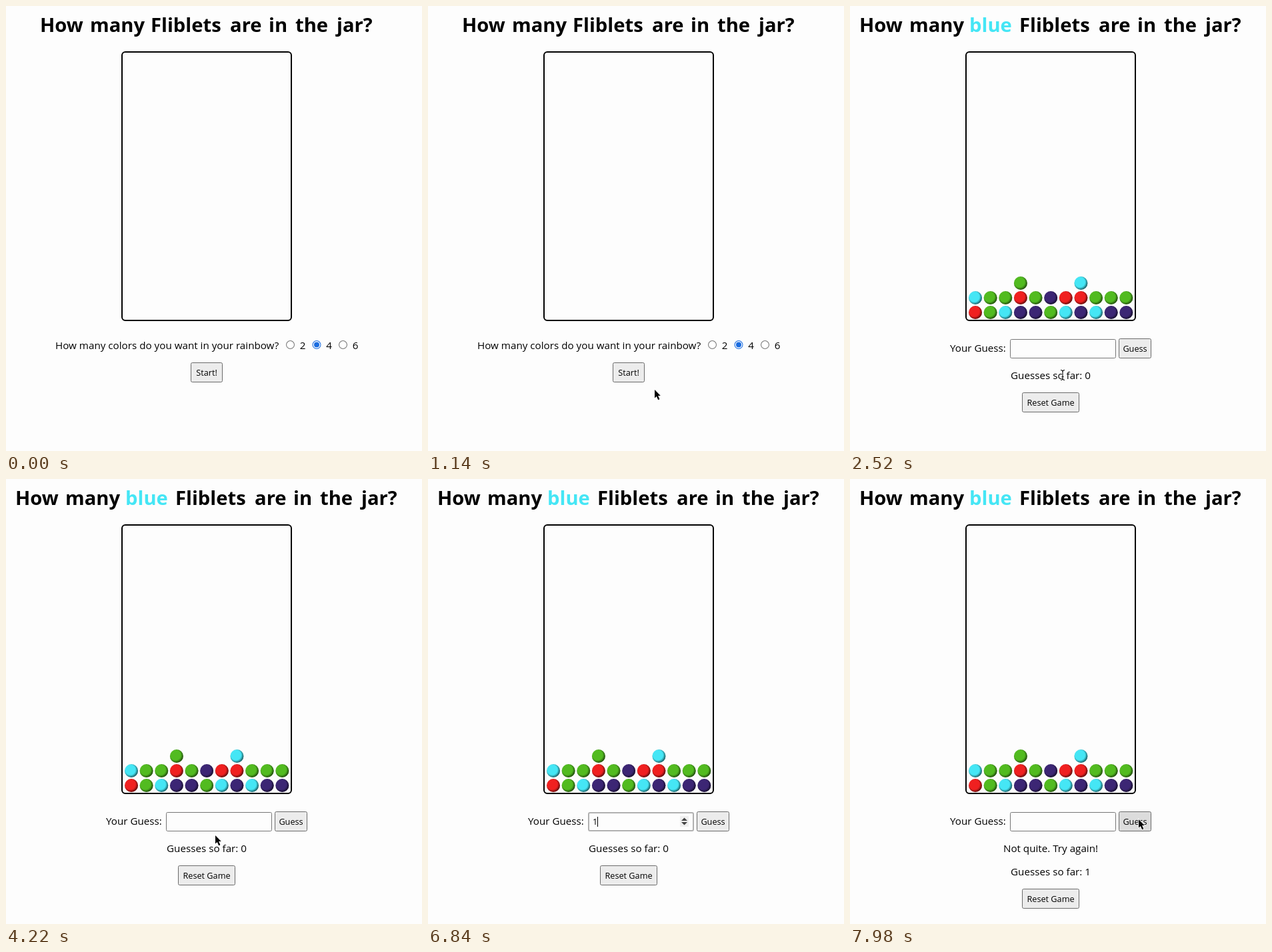
An HTML page with a canvas for the animation above (8 s loop, 624 by 668 pixels).

```html
<!DOCTYPE html>
<html lang="en">
<head>
<meta charset="utf-8">
<title>How many are in the jar?</title>
<style>
  html, body { margin: 0; width: 100%; height: 100%; overflow: hidden; background: #fdfdfd; }
  canvas { display: block; }
</style>
</head>
<body>
<canvas id="stage" width="624" height="668"></canvas>
<script>
const ctx = document.getElementById('stage').getContext('2d');
const LOOP = 8000, START = 2500, FOCUS = 4600, TYPED = 6400, BLUR = 7600, RESULT = 7680;
const PAPER = '#fdfdfd', BUTTON = '#ececec', BUTTON_HOVER = '#dcdcdc', BLUE = '#45e6f5';
const FONT = '"Open Sans", "Noto Sans", sans-serif';
const CANDY = { r: '#f02020', g: '#52bb20', b: BLUE, p: '#3c2674' };
const ROWS = ['rgbppgbpbpp', 'bggrgprrggg', '   g   b   ']; // bottom row first

// Pointer stops: time, x, y
const PATH = [
  [100, 395, 672], [820, 345, 594], [1140, 340, 576], [1240, 340, 576], [1700, 319, 554],
  [3400, 319, 554], [4180, 314, 535], [4320, 314, 535], [4560, 317, 511],
  [6900, 317, 511], [7400, 433, 511]
];

function pointerAt(t) {
  const next = PATH.findIndex(stop => stop[0] > t);
  if (next < 0) return PATH[PATH.length - 1].slice(1);
  if (next === 0) return PATH[0].slice(1);
  const [t0, x0, y0] = PATH[next - 1], [t1, x1, y1] = PATH[next];
  const u = (t - t0) / (t1 - t0), k = u * u * (3 - 2 * u);
  return [x0 + (x1 - x0) * k, y0 + (y1 - y0) * k];
}

const inside = ([px, py], x, y, w, h) => px >= x && px <= x + w && py >= y && py <= y + h;

function text(str, x, y, { size = 15.2, weight = 500, color = '#000', align = 'left' } = {}) {
  ctx.font = `${weight} ${size}px ${FONT}`;
  ctx.textAlign = align;
  ctx.fillStyle = color;
  ctx.fillText(str, x, y);
}

function box(x, y, w, h, radius, line, stroke, fill) {
  ctx.beginPath();
  ctx.roundRect(x + line / 2, y + line / 2, w - line, h - line, radius);
  ctx.fillStyle = fill;
  ctx.fill();
  ctx.lineWidth = line;
  ctx.strokeStyle = stroke;
  ctx.stroke();
}

function disc(x, y, r, fill) {
  ctx.beginPath();
  ctx.arc(x, y, r, 0, Math.PI * 2);
  ctx.fillStyle = fill;
  ctx.fill();
}

function shape(fill, ...points) {
  ctx.beginPath();
  points.forEach(([x, y]) => ctx.lineTo(x, y));
  ctx.closePath();
  ctx.fillStyle = fill;
  ctx.fill();
}

function button(label, x, y, w, pointer) {
  const hover = inside(pointer, x, y, w, 30);
  box(x, y, w, 30, 2, 1, '#6b6b6b', hover ? BUTTON_HOVER : BUTTON);
  text(label, x + w / 2, y + 20, { size: 12.7, align: 'center' });
}

function title(playing) {
  const style = { size: 29.2, weight: 700 }, shift = playing ? 37 : 0;
  text('How', 51 - shift, 39, style);
  text('many', 126 - shift, 39, style);
  if (playing) text('blue', 179, 39, { ...style, color: BLUE });
  text('Fliblets', 217 + shift, 39, style);
  text('are', 336 + shift, 39, style);
  text('in', 394 + shift, 39, style);
  text('the', 434 + shift, 39, style);
  text('jar?', 496 + shift, 39, style);
}

function candy(x, y, color) {
  disc(x, y, 10, color);
  const shade = ctx.createRadialGradient(x - 1.5, y - 1.5, 7.5, x - 1.5, y - 1.5, 12);
  shade.addColorStop(0, 'rgba(0,0,0,0)');
  shade.addColorStop(1, 'rgba(0,0,0,.65)');
  disc(x, y, 10, shade);
}

function jar(playing) {
  box(173, 68, 256, 405, 5, 2, '#000', PAPER);
  if (!playing) return;
  ROWS.forEach((row, j) => [...row].forEach((key, i) => {
    if (key !== ' ') candy(188 + 22.63 * i, 460 - 22 * j, CANDY[key]);
  }));
}

function setup(pointer) {
  text('How many colors do you want in your rainbow?', 74, 515);
  [2, 4, 6].forEach((n, i) => {
    const x = 426.5 + 39.5 * i, checked = n === 4;
    disc(x, 508.5, 6.5, checked ? '#1a6ce0' : '#767676');
    disc(x, 508.5, 5.4, '#fff');
    if (checked) disc(x, 508.5, 4, '#1a6ce0');
    text(n, x + 14.3, 515);
  });
  button('Start!', 277, 535, 48, pointer);
}

function numberField(t, pointer) {
  const focused = t >= FOCUS && t < BLUR;
  box(240, 500, 159, 29, 2, focused ? 2 : 1, focused ? '#b0b0b0' : '#767676', PAPER);
  if (focused || inside(pointer, 240, 500, 159, 29)) {
    ctx.fillStyle = '#efefef';
    ctx.fillRect(378, 506, 13, 16);
    shape('#444', [380, 513], [384.5, 508.5], [389, 513]);
    shape('#444', [380, 515], [384.5, 519.5], [389, 515]);
  }
  const typed = t >= TYPED;
  if (typed && t < RESULT) text('1', 247, 519, { size: 12.7 });
  const blink = (t - (typed ? TYPED : FOCUS)) % 1000 < 500;
  if (focused && blink) {
    ctx.fillStyle = '#000';
    ctx.fillRect(typed ? 254 : 247, 507, 1, 15);
  }
}

function game(t, pointer) {
  const guessed = t >= RESULT, drop = guessed ? 35 : 0;
  text('Your Guess:', 150, 519);
  numberField(t, pointer);
  button('Guess', 403, 499, 49, pointer);
  if (guessed) text('Not quite. Try again!', 301, 560, { align: 'center' });
  text('Guesses so far: ' + (guessed ? 1 : 0), 301, 560 + drop, { align: 'center' });
  button('Reset Game', 258, 580 + drop, 86, pointer);
}

function iBeam() {
  ctx.beginPath();
  for (const s of [-1, 1]) {
    ctx.moveTo(-3, 7.5 * s);
    ctx.quadraticCurveTo(0, 7.5 * s, 0, 5 * s);
    ctx.quadraticCurveTo(0, 7.5 * s, 3, 7.5 * s);
  }
  ctx.moveTo(0, -6);
  ctx.lineTo(0, 6);
  ctx.moveTo(-1.5, 2.5);
  ctx.lineTo(1.5, 2.5);
  for (const [width, color] of [[2.6, '#fff'], [1.1, '#000']]) {
    ctx.lineWidth = width;
    ctx.strokeStyle = color;
    ctx.stroke();
  }
}

function arrow() {
  shape('#000', [0, 0], [0, 12.5], [2.8, 9.9], [5.2, 15.2], [7.4, 14.2], [5.1, 9], [8.8, 9]);
  ctx.lineWidth = 1.6;
  ctx.strokeStyle = '#fff';
  ctx.stroke();
  ctx.fill();
}

function cursor(t, pointer, playing) {
  if (t < PATH[0][0] || (t >= TYPED && t < 6900)) return;
  const overText = playing &&
    (inside(pointer, 240, 500, 159, 29) || inside(pointer, 240, 545, 122, 18));
  ctx.save();
  ctx.translate(...pointer);
  if (overText) iBeam(); else arrow();
  ctx.restore();
}

function draw(now) {
  const t = now % LOOP, playing = t >= START, pointer = pointerAt(t);
  ctx.fillStyle = PAPER;
  ctx.fillRect(0, 0, 624, 668);
  title(playing);
  jar(playing);
  if (playing) game(t, pointer); else setup(pointer);
  cursor(t, pointer, playing);
}

const begin = performance.now();
function loop() {
  draw(performance.now() - begin);
  requestAnimationFrame(loop);
}
loop();
</script>
</body>
</html>
```
